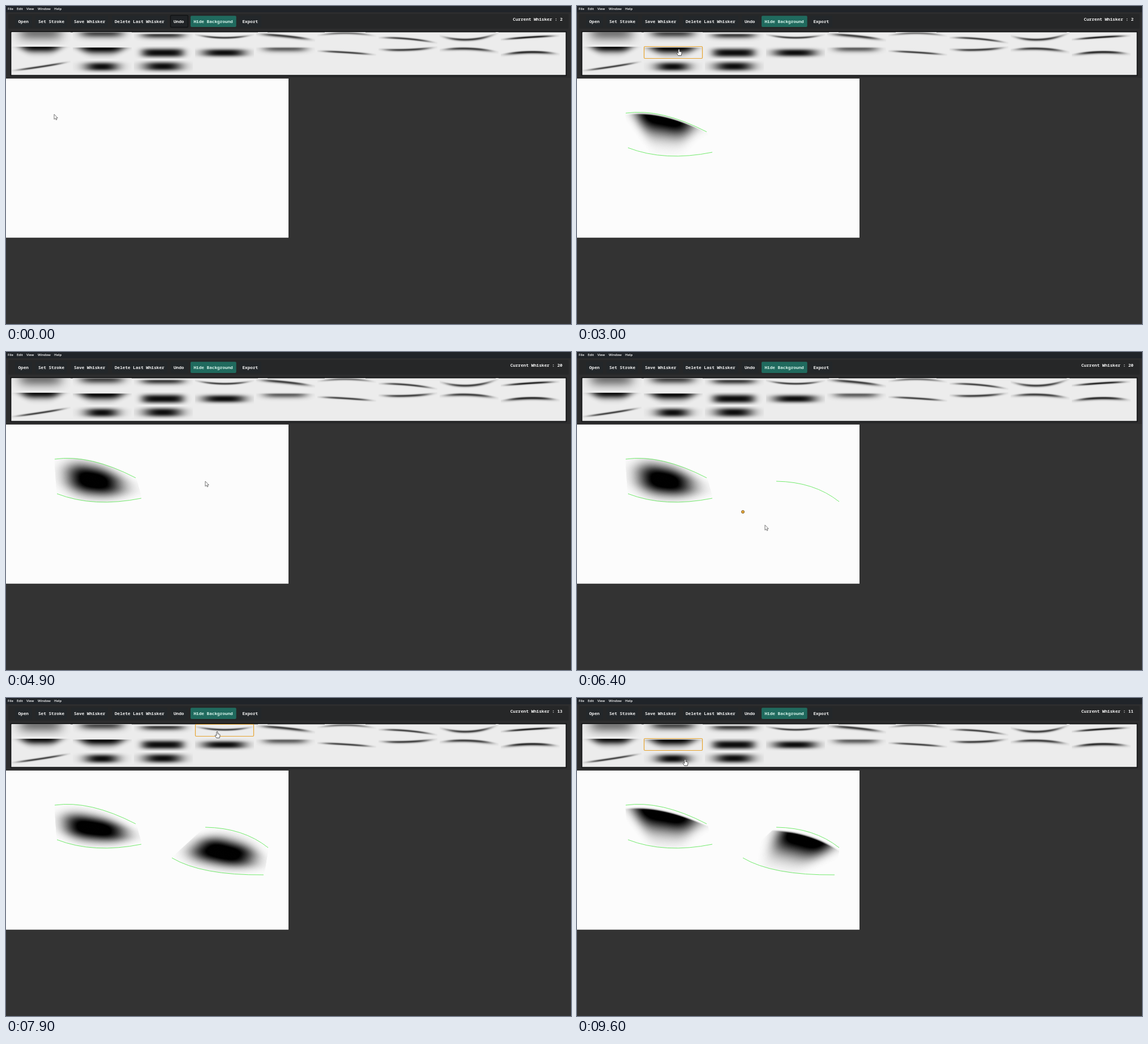
An HTML page with a canvas for the animation above (9900 ms loop, 998 by 561 pixels).

```html
<!DOCTYPE html>
<html lang="en">
<head>
<meta charset="utf-8">
<title>Whisker editor</title>
<style>
  html, body { margin: 0; width: 100%; height: 100%; overflow: hidden; background: #333; }
  svg, canvas { position: absolute; left: 0; top: 0; width: 998px; height: 561px; }
  text { white-space: pre; }
  .menu { font: 600 5.9px "Open Sans", sans-serif; fill: #fff; }
  .tool { font: 600 7.7px "Noto Sans Mono", "DejaVu Sans Mono", monospace; fill: #f2f2f2; }
  .btn { fill: #23272a; }
</style>
</head>
<body>
<svg viewBox="0 0 998 561">
  <rect width="998" height="127" fill="#2d2d2e"/>
  <rect width="998" height="11" fill="#202429"/>
  <rect x="4" y="14" width="990" height="26" rx="2" fill="#262728"/>
  <g class="menu">
    <text x="3" y="7.4">File</text>
    <text x="19" y="7.4">Edit</text>
    <text x="36" y="7.4">View</text>
    <text x="56" y="7.4">Window</text>
    <text x="85" y="7.4">Help</text>
  </g>
  <g class="btn">
    <rect x="16" y="17" width="30" height="20" rx="2"/>
    <rect x="52" y="17" width="56" height="20" rx="2"/>
    <rect x="115" y="17" width="65" height="20" rx="2"/>
    <rect x="187" y="17" width="98" height="20" rx="2"/>
    <rect x="291" y="17" width="30" height="20" rx="2"/>
    <rect x="412" y="17" width="39" height="20" rx="2"/>
  </g>
  <rect id="focus" x="290.5" y="16.5" width="31" height="21" rx="2" fill="#202326" stroke="#111314" stroke-width="1.5"/>
  <rect x="326" y="17.3" width="80.7" height="19.7" rx="2" fill="#206a5e"/>
  <g class="tool">
    <text x="21.5" y="29.6">Open</text>
    <text x="57" y="29.6">Set Stroke</text>
    <text x="120" y="29.6">Save Whisker</text>
    <text x="192" y="29.6">Delete Last Whisker</text>
    <text x="296" y="29.6">Undo</text>
    <text x="331.5" y="29.6" fill="#d5f3ea">Hide Background</text>
    <text x="417.5" y="29.6">Export</text>
    <text id="label" x="983" y="25.8" text-anchor="end">Current Whisker : 2</text>
  </g>
  <rect x="7.5" y="44.5" width="983" height="79" rx="1" fill="#151617"/>
  <rect x="9.4" y="46.4" width="979.2" height="75.2" fill="#ececec"/>
  <rect y="128" width="499" height="280.7" fill="#fcfcfc"/>
</svg>
<canvas id="stage" width="998" height="561"></canvas>
<script>
const LOOP = 9900, STEP = 100, W = 998, H = 561;
const CELL_W = 104, CELL_H = 22, PITCH_X = 108, PITCH_Y = 24.7, COLS = 9;
const ctx = document.getElementById('stage').getContext('2d');
const label = document.getElementById('label');
const focusBox = document.getElementById('focus');

const quad = (a, b, c, u) => a * (1 - u) ** 2 + 2 * b * u * (1 - u) + c * u * u;
const bell = (d, r, p) => Math.exp(-(Math.abs(d / r) ** p));

// A brush gives the ink at u (0 to 1 across) and y (0 to CELL_H down).
// Flat top edge fading downwards; taper narrows it with depth.
const pad = (edge, up, down, strength, half, taper) => (u, y) => {
  const d = y - edge;
  const width = half * (1 - taper * Math.max(0, d) / CELL_H);
  return strength * bell(u - .49, width, 4) * bell(d, d < 0 ? up : down, 2);
};
const band = (edge, down, strength) => pad(edge, 2, down, strength, .37, 0);
const blob = (mid, ry, half, p) => (u, y) =>
  .95 * bell(u - .49, half, p) * bell(y - mid, ry, 2.6);
// Thin line through three heights, softer on its lower side
const stroke = (left, mid, right, soft = 1.8, strength = .75) => (u, y) => {
  const d = y - quad(left, 2 * mid - (left + right) / 2, right, (u - .13) / .75);
  return strength * bell(u - .49, .38, 4) * bell(d, d < 0 ? 1.8 : soft, 2);
};

const BRUSHES = [
  band(1, 14, .5), band(2, 8, .7), band(5, 6, .75),
  stroke(7, 10, 7), stroke(4, 7, 12, 3), stroke(4, 2, 5, 2, .5),
  stroke(10, 12, 17), stroke(10, 13, 6, 2.5), stroke(12, 9, 7, 1.8, .9),
  pad(1.5, .7, 9.5, .95, .35, .5), pad(3, .8, 10, 1, .39, .5),
  blob(11.5, 7.5, .36, 5), blob(11.5, 6.5, .37, 3.2), band(4, 6, .6),
  stroke(9, 11, 14), stroke(6, 6, 3, 2.5), stroke(5, 4, 8, 3), stroke(13, 10, 12, 3, .85),
  stroke(16.5, 11, 4.5), blob(11, 7.5, .29, 2.6), blob(10.5, 7.7, .33, 2.7)
];

// Start, control and end point, clicked one after another
const curve = (p, start, beat) => ({
  p, end: start + 2 * beat,
  clicks: p.map(([x, y], i) => [start + i * beat, x, y])
});
const CURVES = [
  curve([[86, 189], [148, 180], [229, 222]], 300, 300),
  curve([[90, 250], [155, 275], [239, 258]], 1600, 350),
  curve([[352, 228], [419, 229], [463, 264]], 4900, 400),
  curve([[293, 282], [345, 313], [455, 312]], 6200, 400)
];
const EYES = [CURVES.slice(0, 2), CURVES.slice(2)];

// Pointer keys (time, x, y): the clicks plus the visits to the brush strip
const ROUTE = [
  [0, 85, 191], ...CURVES.flatMap(c => c.clicks),
  [2700, 90, 128], [2800, 100, 85], [3000, 180, 76], [3300, 185, 106], [3800, 262, 104], [4600, 268, 104],
  [7500, 575, 112], [7600, 495, 83], [7700, 430, 78], [7900, 373, 59], [8300, 280, 58],
  [8600, 180, 58], [8900, 275, 80], [9300, 260, 80], [9500, 190, 82], [9600, 191, 108]
].sort((a, b) => a[0] - b[0]);

const ARROW = new Path2D('M0 0V9L2.1 7.1L3.5 10L5 9.3L3.7 6.5H6.3Z');
const HAND = new Path2D('M-1.1 1Q0-.8 1.1 1V4.3L4.2 5Q5.3 5.4 5 7L4.2 11.5H-1.2L-3.6 7.8Q-3.8 6.3-2.4 6.5L-1.1 7.4Z');

function pointerAt(t) {
  const i = ROUTE.findIndex(k => k[0] > t);
  if (i < 0) return ROUTE[ROUTE.length - 1].slice(1);
  const [t0, x0, y0] = ROUTE[i - 1], [t1, x1, y1] = ROUTE[i];
  const f = 1 - (1 - (t - t0) / (t1 - t0)) ** 2;
  return [x0 + (x1 - x0) * f, y0 + (y1 - y0) * f];
}

const cell = k => [10 + PITCH_X * (k % COLS), Math.round(46.2 + PITCH_Y * Math.floor(k / COLS))];

// Brush under the pointer, or -1
function brushAt(t) {
  if (t < 0) return -1;
  const [x, y] = pointerAt(t);
  const k = COLS * Math.floor((y - 46) / PITCH_Y) + Math.floor((x - 10) / PITCH_X);
  return y >= 46 && k < BRUSHES.length ? k : -1;
}

function lastBrush(t) {
  while (t >= 0 && brushAt(t) < 0) t -= STEP;
  return { k: brushAt(t), at: t };
}

function layer() {
  const c = document.createElement('canvas');
  c.width = W;
  c.height = H;
  return c;
}

function dab(g, x, y, size, ink, paper) {
  if (ink < .005) return;
  const v = Math.round(paper * (1 - Math.min(1, ink)));
  g.fillStyle = `rgb(${v},${v},${v})`;
  g.fillRect(x, y, size, size);
}

function makeStrip() {
  const c = layer(), g = c.getContext('2d');
  BRUSHES.forEach((brush, k) => {
    const [x, y] = cell(k);
    for (let i = 0; i < CELL_W; i++)
      for (let j = 0; j < CELL_H; j++)
        dab(g, x + i, y + j, 1, brush((i + .5) / CELL_W, j + .5), 236);
  });
  return c;
}

const along = ([a, b, c], u) => [quad(a[0], b[0], c[0], u), quad(a[1], b[1], c[1], u)];

// Brush stretched between the two curves of an eye
const cache = {};
function eyeLayer(n, k) {
  const key = n + '/' + k;
  if (cache[key]) return cache[key];
  const c = cache[key] = layer(), g = c.getContext('2d');
  const [top, bottom] = EYES[n], cols = 200, rows = 100;
  for (let i = 0; i <= cols; i++) {
    const u = i / cols;
    const [ax, ay] = along(top.p, u), [bx, by] = along(bottom.p, u);
    for (let j = 0; j <= rows; j++) {
      const v = j / rows;
      dab(g, ax + (bx - ax) * v - .6, ay + (by - ay) * v - .6, 1.4,
        1.2 * BRUSHES[k](u, v * CELL_H), 252);
    }
  }
  return c;
}

function drawCurve({ p, clicks, end }, t) {
  if (t >= end) {
    ctx.beginPath();
    ctx.moveTo(...p[0]);
    ctx.quadraticCurveTo(...p[1], ...p[2]);
    ctx.strokeStyle = '#72ea6c';
    ctx.lineWidth = 1;
    ctx.stroke();
    return;
  }
  for (const [at, x, y] of clicks) {
    if (t <= at) break;
    ctx.beginPath();
    ctx.arc(x, y, 2.6, 0, 7);
    ctx.fillStyle = '#e3a535';
    ctx.fill();
    ctx.strokeStyle = '#6e5530';
    ctx.lineWidth = .8;
    ctx.stroke();
  }
}

function drawPointer(t) {
  const hand = brushAt(t) >= 0, shape = hand ? HAND : ARROW;
  ctx.save();
  ctx.translate(...pointerAt(t));
  ctx.lineJoin = 'round';
  ctx.lineWidth = .9;
  ctx.strokeStyle = hand ? '#444' : '#666';
  ctx.fillStyle = '#fff';
  ctx.fill(shape);
  ctx.stroke(shape);
  ctx.restore();
}

const strip = makeStrip();

// Outline, eyes and number each trail the pointer by one more step
function draw(t) {
  const outlined = brushAt(t - STEP);
  const painted = lastBrush(t - 2 * STEP);
  const shown = lastBrush(t - 3 * STEP).k;
  label.textContent = 'Current Whisker : ' + (shown < 0 ? 2 : shown);
  focusBox.style.display = t < STEP ? '' : 'none';
  ctx.clearRect(0, 0, W, H);
  ctx.drawImage(strip, 0, 0);
  EYES.forEach((eye, n) => {
    if (painted.at >= eye[1].end) ctx.drawImage(eyeLayer(n, painted.k), 0, 0);
  });
  CURVES.forEach(c => drawCurve(c, t));
  if (outlined >= 0) {
    const [x, y] = cell(outlined);
    ctx.strokeStyle = '#e6a32e';
    ctx.lineWidth = 1.2;
    ctx.beginPath();
    ctx.roundRect(x + .5, y + .5, CELL_W - 1, CELL_H - 1, 1.5);
    ctx.stroke();
  }
  drawPointer(t);
}

const start = performance.now();
let last = -1;
function tick() {
  const t = Math.floor((performance.now() - start) % LOOP / STEP) * STEP;
  if (t !== last) draw(last = t);
  requestAnimationFrame(tick);
}
tick();
</script>
</body>
</html>
```
